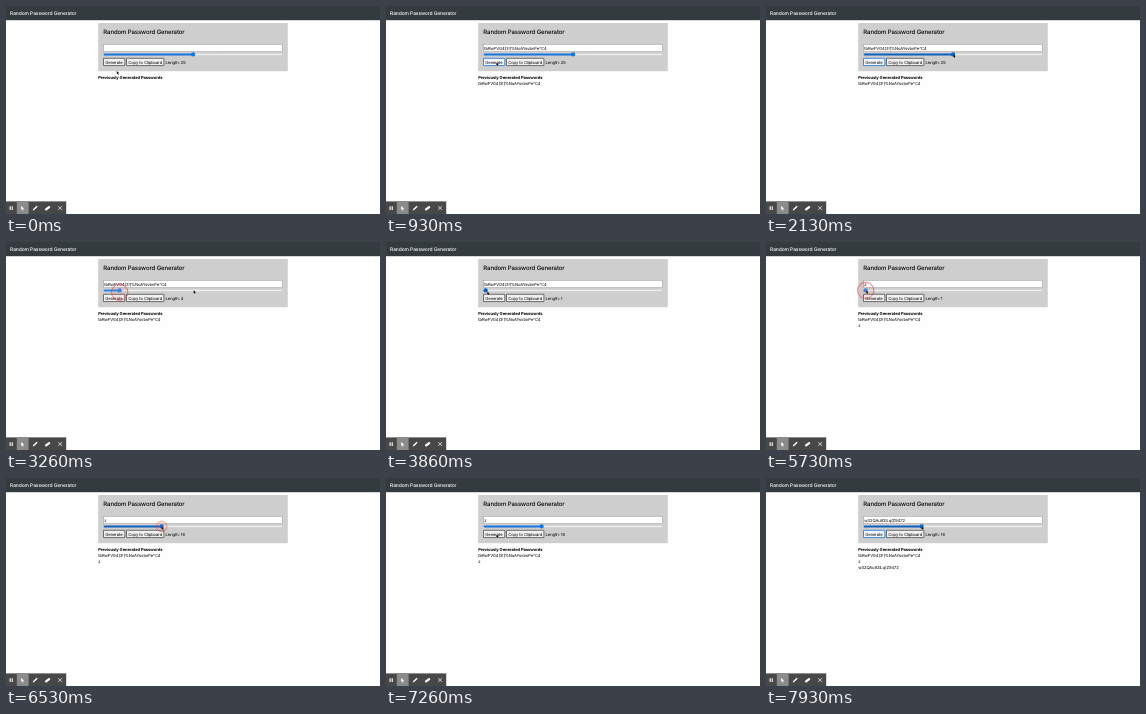
An HTML page that plays this animation: 374 by 208 pixels, repeating every 8000 ms.

```html
<!DOCTYPE html>
<html lang="en">
<head>
<meta charset="utf-8">
<title>Random Password Generator</title>
<style>
  html, body { margin: 0; width: 100%; height: 100%; overflow: hidden; background: #fefefe; }
  svg { display: block; width: 100%; height: 100%; }
  text {
    font: 4.155px Inter, "Liberation Sans", sans-serif;
    letter-spacing: -.02em;
    text-rendering: geometricPrecision;
    white-space: pre;
  }
  .brand { font-size: 4.95px; font-weight: 500; fill: #fff; }
  .title { font-size: 6.06px; font-weight: 500; }
  .bold { font-weight: 700; }
  .button { fill: #f1f1f1; stroke: #1c1c1c; stroke-width: .6; }
  .button.focus { fill: #f4f8fd; stroke: #1670d2; stroke-width: .8; }
  .icon { fill: #fff; }
  .line { fill: none; stroke: #fff; stroke-linecap: round; }
</style>
</head>
<body>
<svg viewBox="0 0 374 208" preserveAspectRatio="none">
  <rect width="374" height="14.2" fill="#333b3e"/>
  <text class="brand" x="4.1" y="9">Random Password Generator</text>

  <rect x="92.2" y="17" width="189.6" height="48.2" fill="#cecece"/>
  <text class="title" x="97.3" y="28.3">Random Password Generator</text>
  <rect x="97.6" y="38.3" width="178.8" height="7.4" fill="#fff" stroke="#8c8c8c" stroke-width=".45"/>
  <text id="field" x="98.3" y="43.5"></text>

  <rect x="97.7" y="47.5" width="178.8" height="1.7" rx=".85" fill="#f6f6f6" stroke="#b4b4b4" stroke-width=".3"/>
  <rect id="fill" x="97.6" y="47.4" height="2" rx="1"/>
  <circle id="thumb" cy="48.4" r="2.1"/>

  <rect id="generate" class="button" x="97.5" y="52.3" width="21.3" height="7.3" rx=".3"/>
  <text x="99.3" y="57.5">Generate</text>
  <rect class="button" x="120.5" y="52.3" width="37.4" height="7.3" rx=".3"/>
  <text x="122.2" y="57.5">Copy to Clipboard</text>
  <text id="length" x="159.6" y="57.5"></text>

  <text class="bold" x="92.2" y="72.5">Previously Generated Passwords</text>
  <g id="list"></g>

  <g>
    <rect y="195.4" width="60.2" height="12.6" fill="#484848"/>
    <rect x="10.8" y="195.4" width="11.8" height="12.6" fill="#8b8b8b"/>
    <path class="icon" d="M3.6 200.2h1.1v3.8h-1.1zM5.7 200.2h1.1v3.8h-1.1z"/>
    <path class="icon" d="M15.2 199.9l3 2.9-1.4.1.8 1.5-.7.4-.8-1.6-.9.9z"/>
    <path class="icon" d="M26.7 204.5l.5-1.5 3.4-3.2 1 1-3.4 3.3z"/>
    <path class="line" stroke-width="2.3" d="M40.1 203.4l3-2.3"/>
    <path class="line" stroke-width=".7" d="M52.5 200.4l3.3 3.3m0-3.3l-3.3 3.3"/>
  </g>

  <path id="cursor" d="M0 0v3.1l.7-.6.6 1.2.6-.3-.5-1.2h1z" stroke="#fff" stroke-width=".3" paint-order="stroke"/>
  <circle id="ring" fill="#ff5050" fill-opacity=".08" stroke="#dc444a" stroke-width=".8"/>
</svg>
<script>
const LOOP = 120;          // steps per loop
const STEP = 8000 / LOOP;  // ms per step
const $ = id => document.getElementById(id);
const [field, fill, thumb, generate, lengthLabel, list, cursor, ring] =
  ["field", "fill", "thumb", "generate", "length", "list", "cursor", "ring"].map($);

// The pointer travels from `from` to `arrive`, then presses from `down` to `up`.
// A press with a password clicks the button, any other drags the slider to `value`.
const gestures = [
  { from: 2, arrive: 6, down: 11, up: 13, password: "tbRwFVG4(3!(%NoAYsvbnPe^C4" },
  { from: 23, arrive: 33, down: 40, up: 54, value: 0 },
  { from: 55, arrive: 64, down: 66, up: 69, password: "z" },
  { from: 74, arrive: 85, down: 86, up: 98, value: 16 },
  { from: 100, arrive: 108, down: 110, up: 112, password: "w32QAu92lLq(Z9472" },
  { from: 113, arrive: LOOP, down: LOOP, up: LOOP + 1, value: 16 }
];

const mix = (a, b, p) => a + (b - a) * p;
const progress = (n, a, b) => Math.min(1, Math.max(0, (n - a) / (b - a)));
const ease = p => p < .5 ? 4 * p ** 3 : 1 - 4 * (1 - p) ** 3;
const thumbX = value => 99.7 + 3.496 * value;

const rows = gestures.filter(g => g.password).map((g, i) => {
  const row = document.createElementNS("http://www.w3.org/2000/svg", "text");
  set(row, { x: 92.2, y: 78.7 + i * 6.23 });
  return list.appendChild(row);
});

function set(el, attrs) {
  for (const name in attrs) el.setAttribute(name, attrs[name]);
}

// Replays every gesture begun by step n.
function stateAt(n) {
  const s = { x: 110.8, y: 65, value: 25, passwords: [], focus: false, ring: null, dragging: false };
  for (const g of gestures) {
    if (n < g.from) break;
    const click = Boolean(g.password);
    const travel = ease(progress(n, g.from, g.arrive));
    s.x = mix(s.x, click ? 110.4 : thumbX(s.value) + .5, travel);
    s.y = mix(s.y, click ? 56.4 : 48.2, travel);
    if (n < g.down) break;

    const held = n < g.up;
    const drag = progress(n, g.down, g.up);
    s.focus = click;
    if (!click) {
      s.value = Math.floor(mix(s.value, g.value, ease(drag)));
      s.dragging = held;
      if (!held) s.x = thumbX(s.value); // the arrow catches up on release
    } else if (n > g.down) {
      s.passwords.push(g.password);
    }
    s.ring = n > g.up ? null : {
      cx: click ? s.x + .3 : thumbX(s.value),
      cy: click ? 57.2 : 48.4 + 2 * Math.sin(Math.PI * drag),
      r: held ? 8.2 : 5.3,
      "stroke-opacity": held ? .85 : .65
    };
  }
  return s;
}

function draw(n) {
  const s = stateAt(n);
  const x = thumbX(s.value);
  const hover = Math.hypot(s.x - x, s.y - 48.4) < 3;
  const blue = s.dragging ? "#2b86ea" : hover ? "#0b5fbd" : "#1575df";
  set(fill, { width: x - 97.6, fill: blue });
  set(thumb, { cx: x, fill: blue });
  lengthLabel.textContent = "Length: " + Math.max(1, s.value);

  field.textContent = s.passwords.at(-1) || "";
  rows.forEach((row, i) => row.textContent = s.passwords[i] || "");
  generate.classList.toggle("focus", s.focus);

  set(cursor, { transform: `translate(${s.x} ${s.y})` });
  ring.style.display = s.ring ? "" : "none";
  if (s.ring) set(ring, s.ring);
}

const began = performance.now();
function tick() {
  const t = performance.now() - began;
  draw(Math.floor((t + 6.8) / STEP) % LOOP); // steps fall on whole 10 ms
  requestAnimationFrame(tick);
}
tick();
</script>
</body>
</html>
```
